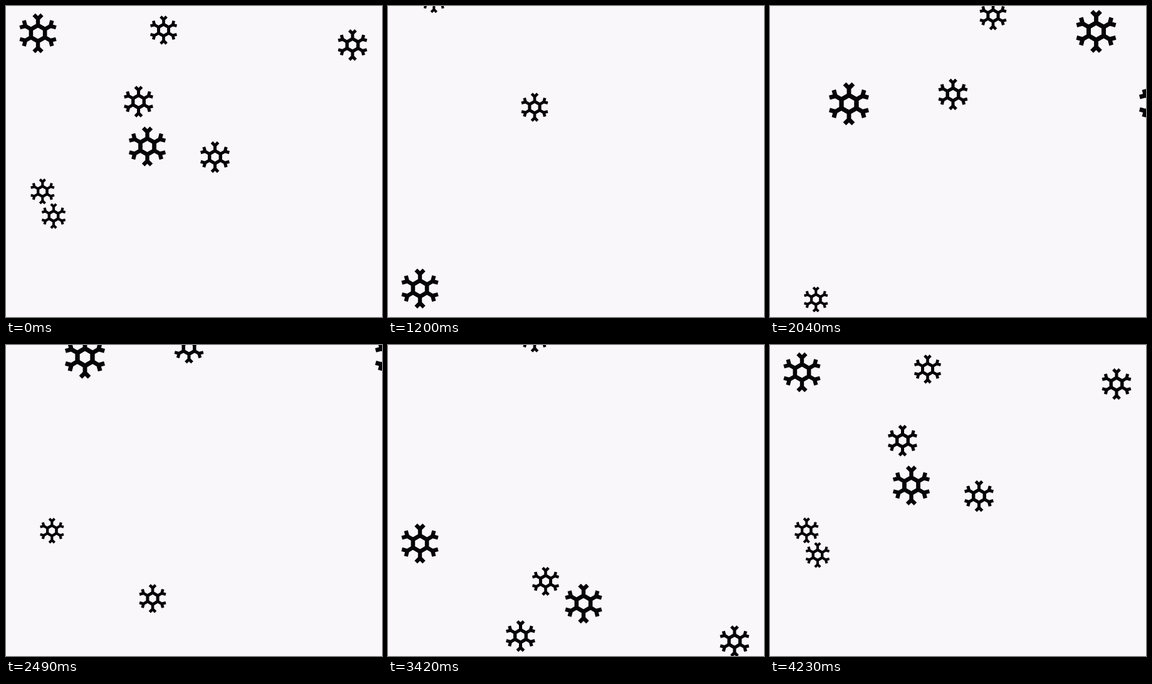
An HTML page that plays this animation: 600x496 px, repeating every 4.26 s.

```html
<!DOCTYPE html>
<html lang="en">
<head>
<meta charset="utf-8">
<title>Snowfall</title>
<style>
  html, body { margin: 0; width: 100%; height: 100%; overflow: hidden; background: #f9f7fa; }
  svg { display: block; width: 600px; height: 496px; }
  #flake { fill: none; stroke: #060507; stroke-width: 6.4; }
</style>
</head>
<body>
<svg id="stage" viewBox="0 0 600 496">
  <defs><g id="flake"></g></defs>
</svg>
<script>
const NS = 'http://www.w3.org/2000/svg';
const STEP = 30, STEPS = 142;
const TINY = 40.5, SMALL = 45.5, MEDIUM = 49.5, LARGE = 62.5, HUGE = 67.5;

const stage = document.getElementById('stage');
const shape = document.getElementById('flake');
const flakes = [];

function add(parent, tag, attrs) {
  const el = document.createElementNS(NS, tag);
  for (const key in attrs) el.setAttribute(key, attrs[key]);
  return parent.appendChild(el);
}

// Six equal sectors: one side of the hexagon and one forked arm each
const RADIUS = 12.9, FORK = 23.3, TIP = 29.8;
const side = RADIUS * Math.sqrt(3) / 2;
for (let a = 0; a < 360; a += 60) {
  add(shape, 'path', {
    d: `M${-side} ${-RADIUS / 2}L0 ${-RADIUS}L${side} ${-RADIUS / 2}` +
       `M0 ${-RADIUS}V${-FORK}M${FORK - TIP} ${-TIP}L0 ${-FORK}L${TIP - FORK} ${-TIP}`,
    transform: `rotate(${a})`
  });
}

// The fall gains speed very slightly
const fall = t => t * (1 + 1.56e-5 * t);

// Adds a flake that passes (x, y) at the given time; speed in px/ms
function drop(at, size, x, y, speed = .43) {
  const node = add(stage, 'use', { href: '#flake' });
  flakes.push({ node, x, size, yAt: t => y + speed * (fall(t) - fall(at)) });
}

// In view at the start
drop(0, LARGE, 51, 43.5, .333);
drop(0, SMALL, 251.5, 38.5, .4125);
drop(0, MEDIUM, 553, 62.3, .5);
drop(0, MEDIUM, 211.5, 152.5, .38);
drop(0, LARGE, 225.5, 224, .406);
drop(0, MEDIUM, 333.5, 241, .481);
drop(0, TINY, 58.3, 295.7, .41);
drop(0, TINY, 76, 335);

// Entering on the way down
drop(480, LARGE, 312, 197, .64);
drop(1200, SMALL, 234, 161.5);

// In view near the turn
drop(2040, TINY, 73.3, 468, .541);
drop(2040, HUGE, 126, 156);
drop(2040, MEDIUM, 292, 141);
drop(2040, SMALL, 356, 15.5);
drop(2040, HUGE, 520.5, 40.5);
drop(2040, HUGE, 621, 155);

function draw(now) {
  const n = Math.floor(now / STEP) % STEPS;
  const t = Math.min(n, STEPS - 1 - n) * STEP; // down, then back up
  for (const { node, x, size, yAt } of flakes) {
    node.setAttribute('transform', `translate(${x} ${yAt(t).toFixed(2)}) scale(${size / 63})`);
  }
}

let start;
function tick(now) {
  start ??= now;
  draw(Math.max(0, now - start));
  requestAnimationFrame(tick);
}
draw(0);
requestAnimationFrame(tick);
</script>
</body>
</html>
```
